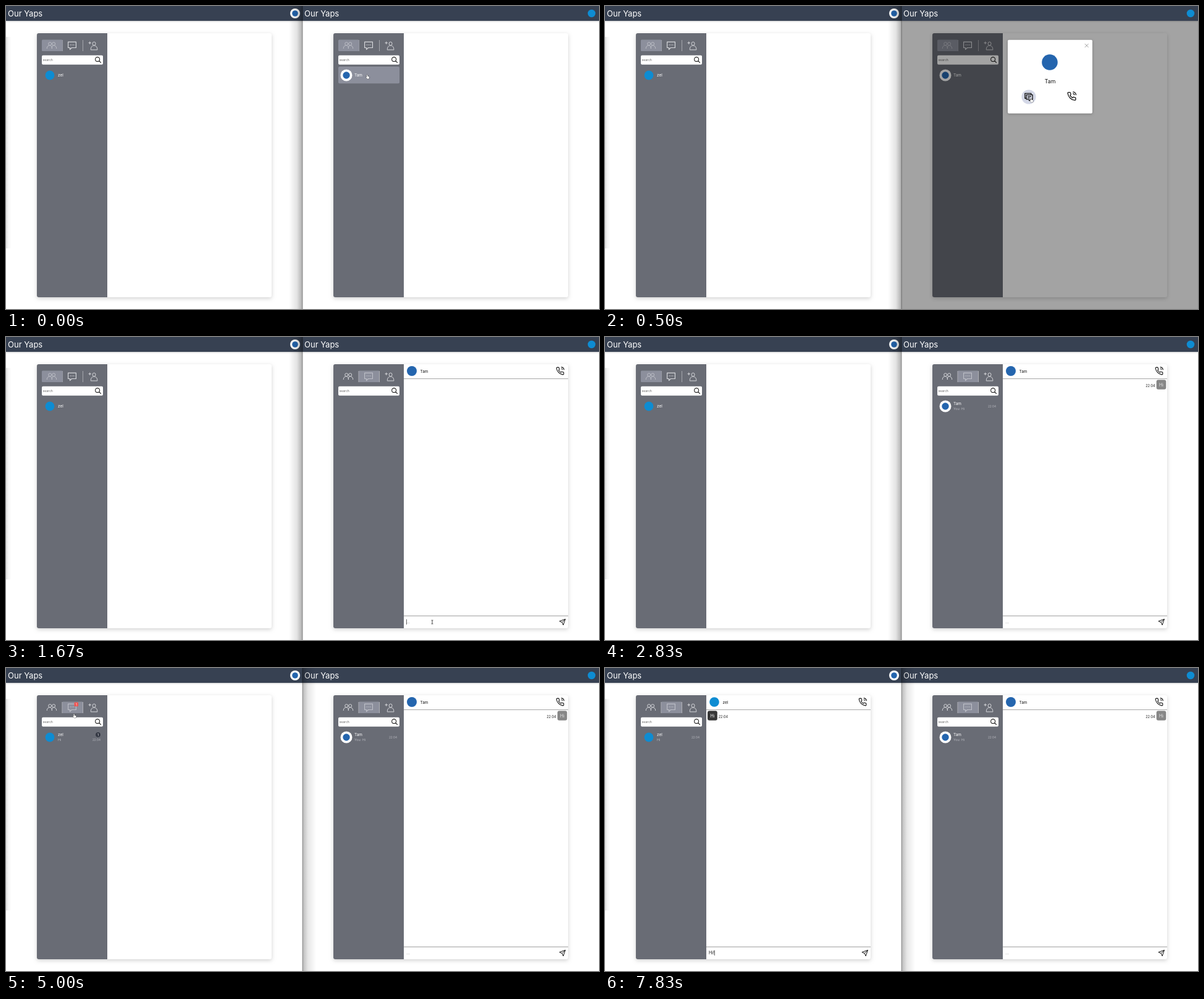
Animation of 960x490 px, one loop 8 s. Source, as an HTML page with a canvas:

```html
<!DOCTYPE html>
<html lang="en">
<head>
<meta charset="utf-8">
<title>Two chat windows</title>
<style>
  html, body { margin: 0; width: 100%; height: 100%; overflow: hidden; background: #fff; }
  canvas { display: block; width: 100vw; height: 100vh; }
</style>
</head>
<body>
<canvas width="960" height="490"></canvas>
<script>
const canvas = document.querySelector('canvas');
const ctx = canvas.getContext('2d');
const LOOP = 8000, STEPS = 48;
const TITLE = 'Our Yaps', LEFT_USER = 'Tam', RIGHT_USER = 'zel';
const BLUE = '#2465ae', CYAN = '#0e8cd2', HIGHLIGHT = '#8c8f9c';

// Icons live in a 24 x 24 box.
const ICONS = {
  people: 'M4.5 8a3.5 3.5 0 1 0 7 0a3.5 3.5 0 1 0-7 0M13 8a3.5 3.5 0 1 0 7 0a3.5 3.5 0 1 0-7 0' +
    'M1 19c0-5 3-7.5 6.5-7.5s5 2.500 5 7.500c0-5 1-7.500 4-7.500s6.500 2.500 6.500 7.500',
  chat: 'M1 2h22v16H11l-5 5v-5H1zM6.500 10h2M11 10h2M15.500 10h2',
  addUser: 'M10.500 7a4 4.500 0 1 0 8 0a4 4.500 0 1 0-8 0M6 23c0-7 3-11 8.500-11S23 16 23 23zM0 5h7M3.500 1.500v7',
  search: 'M2 10a8 8 0 1 0 16 0a8 8 0 1 0-16 0M16 16l7 7',
  phone: 'M15 5a5 5 0 0 1 4 4M15 1a9 9 0 0 1 8 8M22 17v3a2 2 0 0 1-2.200 2A20 20 0 0 1 2.100 4.200' +
    'A2 2 0 0 1 4.100 2h3a2 2 0 0 1 2 1.700l.700 2.800a2 2 0 0 1-.500 2.100L8 9.900a16 16 0 0 0 6 6' +
    'l1.300-1.300a2 2 0 0 1 2.100-.500l2.800.700A2 2 0 0 1 22 17z',
  send: 'M22 2L11 13M22 2l-7 20-4-9-9-4z',
  messages: 'M5 6h18v13h-6l-3 4-3-4H5zM5 16H1V2h18v4M9 11h10M9 15h6',
  close: 'M2 2l20 20M22 2L2 22'
};
for (const name in ICONS) ICONS[name] = new Path2D(ICONS[name]);

const POINTERS = {
  arrow: new Path2D('M0 0v5.500l1.300-1.200 1 2 .900-.500-.900-1.900h1.700z'),
  hand: new Path2D('M0 .500q.700-1 1.200 0v2l2.400.700q.700.300.500 1.300l-.600 2.200H.700L-1.300 4q0-.900 1.300 0z')
};

// step, x, y, pointer shape (empty while typing hides it)
const POINTER_PATH = [
  [0, 584, 111, 'hand'], [1, 584, 111, 'arrow'], [3, 689, 149, 'hand'], [4, 689, 149, 'arrow'],
  [8, 690, 461, 'beam'], [12, 690, 461, ''], [18, 690, 461, 'arrow'], [23, 520, 170, 'arrow'],
  [25, 109.5, 74, 'hand'], [30, 109.5, 74, 'hand'], [32, 104, 111, 'hand'], [33, 104, 111, 'arrow'],
  [35, 252, 464, 'beam'], [42, 252, 464, ''], [STEPS, 252, 464, '']
];

function box(x, y, w, h, color, radius = 0) {
  ctx.fillStyle = color;
  ctx.beginPath();
  ctx.roundRect(x, y, w, h, radius);
  ctx.fill();
}

function disc(x, y, r, color) {
  ctx.fillStyle = color;
  ctx.beginPath();
  ctx.arc(x, y, r, 0, Math.PI * 2);
  ctx.fill();
}

function text(value, x, y, size, color, align = 'left') {
  ctx.font = `${size}px Inter, sans-serif`;
  ctx.fillStyle = color;
  ctx.textAlign = align;
  ctx.fillText(value, x, y);
}

function icon(name, x, y, size, color, weight = 1) {
  const scale = size / 24;
  ctx.save();
  ctx.translate(x - size / 2, y - size / 2);
  ctx.scale(scale, scale);
  ctx.strokeStyle = color;
  ctx.lineWidth = weight / scale;
  ctx.lineJoin = 'round';
  ctx.stroke(ICONS[name]);
  ctx.restore();
}

function withShadow(blur, offset, alpha, paint) {
  ctx.save();
  ctx.shadowColor = `rgba(0,0,0,${alpha})`;
  ctx.shadowBlur = blur;
  ctx.shadowOffsetY = offset;
  paint();
  ctx.restore();
}

function avatar(user, x, y, r, backed) {
  if (user === RIGHT_USER) return disc(x, y, r * 0.78, CYAN);
  if (backed) disc(x, y, r, '#fff');
  disc(x, y, r * (backed ? 0.6 : 0.8), BLUE);
}

function drawTabs(selected, unread) {
  const left = selected === 0 ? 58 : 91;
  box(91, 55, 0.8, 18, '#b5b6bb');
  box(124, 55, 0.8, 18, '#b5b6bb');
  box(left, 54.5, 33.5, 18.5, HIGHLIGHT, 1.5);
  if (selected) {
    box(90.5, 55, 0.8, 18, '#b5b6bb');
    box(124, 55, 0.8, 18, '#b5b6bb');
  }
  icon('people', 74, 64, 17, selected ? '#d5d6da' : '#bcbec6');
  icon('chat', 107, 64, 14, selected ? '#bcbec6' : '#d5d6da', 1.2);
  icon('addUser', 141, 64, 15, '#d5d6da');
  if (unread) {
    box(110.5, 55.5, 6.5, 6.5, '#ef5350', 1);
    text('1', 113.8, 60.6, 5, '#fff', 'center');
  }
}

function drawContact({ peer, hover, preview, unread }) {
  if (hover) box(58, 98, 99, 27.3, HIGHLIGHT, 2);
  avatar(peer, 71, 112, 9.5, true);
  text(peer, 84, preview ? 110 : 114, 6.4, '#fff');
  if (!preview) return;
  text(preview, 84, 118, 5.4, '#b9bac0');
  text('22:04', 153, unread ? 117.5 : 113.7, 4.7, '#b9bac0', 'right');
  if (unread) {
    disc(149, 107.8, 3.9, '#333743');
    text('1', 149, 109.6, 5, '#fff', 'center');
  }
}

function drawConversation({ peer, message, focused, caret, draft }) {
  avatar(peer, 177, 55, 10, false);
  text(peer, 190.5, 58, 6.4, '#111');
  icon('phone', 417, 55, 14, '#111', 1.1);
  box(164, 67, 266, 0.8, '#8a8a8a');
  box(164, 450.6, 266, 0.8, '#9a9a9a');
  if (message === 'sent') {
    box(412.7, 69.3, 15.6, 15.4, '#868686', 3);
    text('Hi', 420.5, 79.5, 7, '#e8e8e8', 'center');
    text('22:04', 410.5, 81.2, 5.5, '#222', 'right');
  } else if (message === 'received') {
    box(166, 69.3, 15.8, 15.4, '#373737', 3);
    text('Hi', 173.9, 79.5, 7, '#fff', 'center');
    text('22:04', 183.7, 81.2, 5.5, '#222');
  }
  if (focused) icon('send', 420.7, 461, 11.5, '#111');
  text(draft || '...', 168, 463.4, 7, draft ? '#111' : '#777');
  if (caret) box(168 + (draft ? ctx.measureText(draft).width : 0), 456.5, 0.7, 8.5, '#222');
}

function drawModal(hover) {
  box(0, 24, 480, 466, 'rgba(0,0,0,.36)');
  withShadow(4, 1, 0.25, () => box(172, 54.7, 137, 119, '#fff', 2));
  icon('close', 299.7, 64, 7, '#888', 0.8);
  avatar(LEFT_USER, 240, 91, 16, false);
  text(LEFT_USER, 240.5, 125, 8.8, '#111', 'center');
  if (hover) disc(206, 147, 11.6, '#d4d8e7');
  icon('messages', 206, 147, 13.5, '#111', 1.3);
  icon('phone', 275.5, 146, 15.5, '#111', 1.3);
}

function drawWindow(x, state) {
  ctx.save();
  ctx.translate(x, 0);
  box(0, 0, 480, 490, '#fff');
  withShadow(2, 1, 0.2, () => box(0, 0, 480, 24, '#374152'));
  text(TITLE, 3, 17, 13, '#fff');
  avatar(state.user, 468, 12, 8, true);

  withShadow(6, 2, 0.18, () => box(50, 44, 380, 427, '#fff', 3));
  box(50, 44, 114, 427, '#696c75', [3, 0, 0, 3]);
  drawTabs(state.tab, state.unread);
  box(58, 79.7, 99, 15, '#fff', 2);
  text('search', 59.5, 89, 5.1, '#666');
  icon('search', 149, 87, 10.5, '#222', 1.1);
  if (state.listed) drawContact(state);
  if (state.open) drawConversation(state);
  if (state.modal) drawModal(state.modalHover);
  ctx.restore();
}

function edgeShadow(from, to, alpha, top, height) {
  const fade = ctx.createLinearGradient(from, 0, to, 0);
  fade.addColorStop(0, `rgba(0,0,0,${alpha})`);
  fade.addColorStop(0.4, `rgba(0,0,0,${alpha * 0.35})`);
  fade.addColorStop(1, 'rgba(0,0,0,0)');
  box(Math.min(from, to), top, Math.abs(to - from), height, fade);
}

function drawPointer(step) {
  const next = POINTER_PATH.findIndex(key => key[0] > step);
  const [start, x0, y0, shape] = POINTER_PATH[next - 1];
  const [end, x1, y1] = POINTER_PATH[next];
  if (!shape) return;
  const part = (step - start) / (end - start);
  ctx.save();
  ctx.translate(x0 + (x1 - x0) * part, y0 + (y1 - y0) * part);
  if (shape === 'beam') {
    box(-0.4, -3, 0.8, 6, '#222');
    box(-1.5, -3.3, 3, 0.7, '#222');
    box(-1.5, 2.6, 3, 0.7, '#222');
  } else {
    const hand = shape === 'hand';
    ctx.lineWidth = hand ? 0.8 : 1;
    ctx.strokeStyle = hand ? '#222' : '#fff';
    ctx.fillStyle = hand ? '#fff' : '#111';
    ctx.stroke(POINTERS[shape]);
    ctx.fill(POINTERS[shape]);
  }
  ctx.restore();
}

function render(time) {
  const step = Math.floor((time % LOOP + 4) / (LOOP / STEPS)) % STEPS;
  const during = (from, to) => step >= from && step < to;
  const sent = step >= 17;

  drawWindow(0, {
    user: LEFT_USER, peer: RIGHT_USER, listed: true,
    tab: step >= 25 ? 1 : 0,
    unread: during(18, 39),
    hover: during(31, 33),
    preview: step >= 30 ? 'Hi' : '',
    open: step >= 33,
    message: step >= 39 ? 'received' : '',
    focused: step >= 36,
    caret: step >= 38 && step !== 40,
    draft: step >= 46 ? 'Hi!' : step >= 45 ? 'Hi' : step >= 42 ? 'H' : ''
  });
  drawWindow(480, {
    user: RIGHT_USER, peer: LEFT_USER,
    listed: step < 4 || sent,
    tab: step >= 4 ? 1 : 0,
    hover: step === 0,
    preview: sent ? 'You: Hi' : '',
    modal: during(1, 4), modalHover: step === 3,
    open: step >= 4,
    message: sent ? 'sent' : '',
    focused: step >= 9,
    caret: during(9, 17),
    draft: during(15, 17) ? 'Hi' : during(12, 15) ? 'H' : ''
  });

  edgeShadow(0, 9, 0.12, 50, 342);
  if (step < 25) edgeShadow(480, 458, 0.32, 0, 490);
  else edgeShadow(480, 502, 0.28, 0, 490);
  box(479.6, 0, 0.9, 490, 'rgba(0,0,0,.4)');
  drawPointer(step);
}

const begin = performance.now();
function tick(now) {
  render(Math.max(0, now - begin));
  requestAnimationFrame(tick);
}
render(0);
requestAnimationFrame(tick);
</script>
</body>
</html>
```
